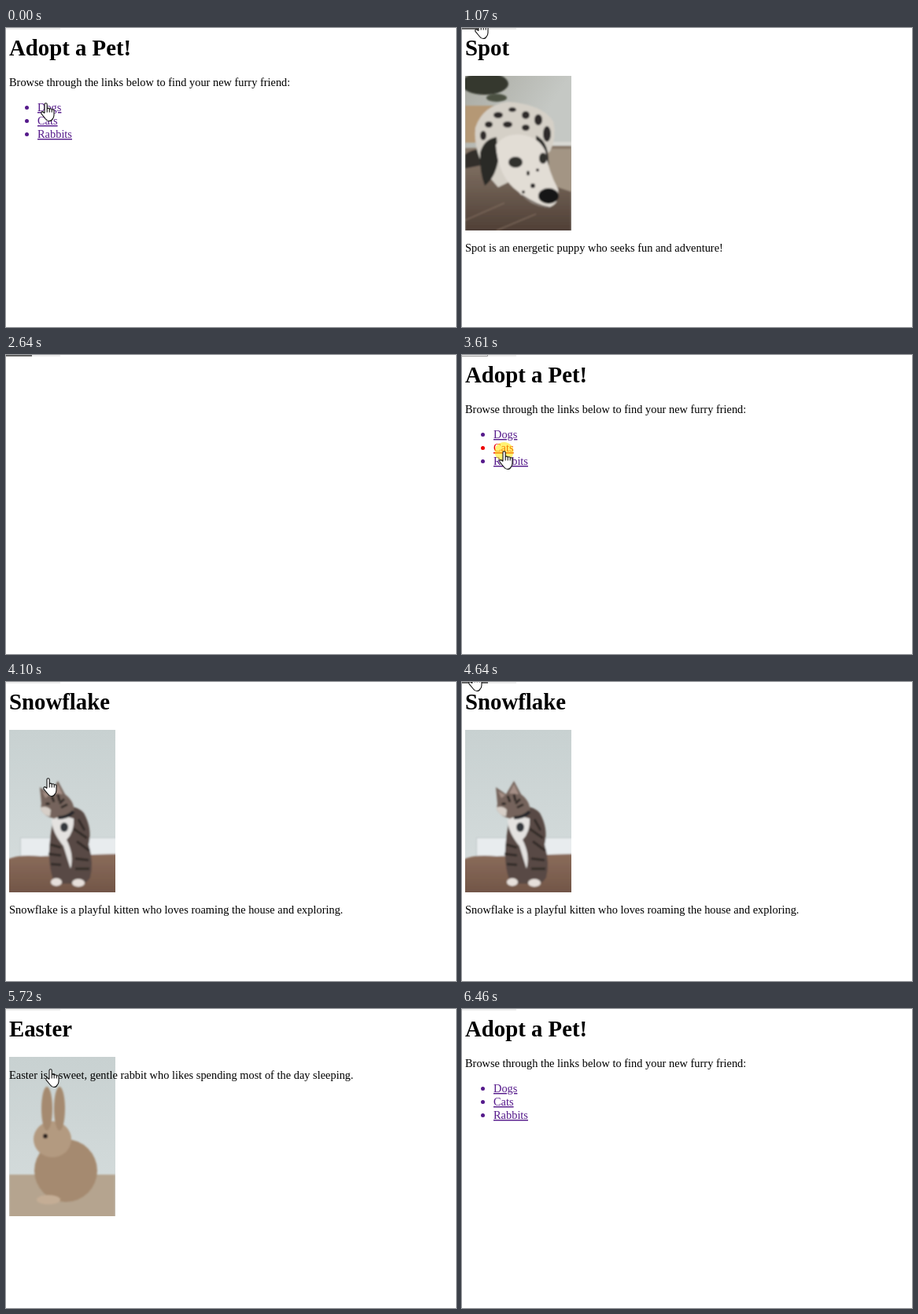
Write an HTML page that moves like this. It is 572x381 px and loops after 6520 ms.

```html
<!DOCTYPE html>
<html lang="en">
<head>
<meta charset="utf-8">
<title>Adopt a Pet</title>
<style>
  html, body { margin: 0; width: 100%; height: 100%; overflow: hidden; background: #fff; }
  svg { display: block; }
  text { font: 14.4px "Liberation Serif", "Times New Roman", serif; fill: #000; white-space: pre; }
  .title { font-size: 28.8px; font-weight: bold; }
  .link text { fill: #551a8b; text-decoration: underline; }
  .link circle { fill: #551a8b; }
  .link.active text, .link.active circle { fill: #e00; }
</style>
</head>
<body>
<svg id="stage" width="572" height="381" viewBox="0 0 572 381">
  <defs>
    <filter id="soft"><feGaussianBlur stdDeviation="0.8"/></filter>
    <linearGradient id="wall" x2="1" y2="1"><stop stop-color="#a9aaa2"/><stop offset=".5" stop-color="#c5c8c4"/></linearGradient>
    <linearGradient id="floor" x2="0" y2="1"><stop stop-color="#8b7b6c"/><stop offset="1" stop-color="#4e3e35"/></linearGradient>
    <linearGradient id="pale" x2="0" y2="1"><stop stop-color="#c8d1d1"/><stop offset="1" stop-color="#d6dddd"/></linearGradient>
    <linearGradient id="rug" x2="0" y2="1"><stop stop-color="#8b6c5b"/><stop offset="1" stop-color="#705446"/></linearGradient>
    <linearGradient id="grass" x2="0" y2="1"><stop stop-color="#b9c0a8"/><stop offset="1" stop-color="#6f7d56"/></linearGradient>
  </defs>
  <g id="pages"></g>
  <rect width="69" height="2" fill="#eee"/>
  <g id="barDark"><rect width="33" height="2" fill="#555"/><rect y="1" width="33" height="1" fill="#777"/></g>
  <path id="barLine" d="M0 1.5H32.5V0" fill="none" stroke="#999"/>
  <circle id="click" r="12" fill="#ffe800" opacity=".55"/>
  <path id="hand" fill="#fff" stroke="#111" stroke-width="1.1" stroke-linejoin="round"
    d="M5 13.5V2.3a1.6 1.6 0 0 1 3.2 0V8.5a1.5 1.4 0 0 1 3 0V9.2a1.5 1.4 0 0 1 3 0V10.2a1.4 1.4 0 0 1 2.8 0V16Q17 19 15 21Q14 23.5 11 23.5Q8 23.5 6.5 21L1 14.4Q.3 12.4 1.6 11.7Q3 11.4 5 13.5M8.2 8.5V12.5M11.2 9.2V12.5M14.2 10V12.5"/>
</svg>
<script>
const LOOP = 6520;
const $ = id => document.getElementById(id);

const line = (x, y, str, cls = "") => `<text x="${x}" y="${y}" class="${cls}">${str}</text>`;
const title = str => line(4, 35, str, "title");
const shape = (d, fill) => `<path d="${d}" fill="${fill}"/>`;
const oval = (x, y, rx, ry, fill) => `<ellipse cx="${x}" cy="${y}" rx="${rx}" ry="${ry}" fill="${fill}"/>`;
const box = (x, y, w, h, fill) => `<rect x="${x}" y="${y}" width="${w}" height="${h}" fill="${fill}"/>`;
const stroke = (d, color, w) => `<path d="${d}" fill="none" stroke="${color}" stroke-width="${w}"/>`;

const links = (y, names) => names.map((name, i) =>
  `<g class="link"><circle cx="26.5" cy="${y - 4.5 + 17 * i}" r="2.5"/>${line(40, y + 17 * i, name)}</g>`).join("");

const pet = (name, height, art, story) => title(name) +
  `<svg class="photo" x="4" y="61" width="135" height="${height}">${art}</svg>` +
  `<g class="story" data-drop="${height - 1}">${line(4, 89, story)}</g>`;

const blurred = art => `<g filter="url(#soft)">${art}</g>`;
const spots = [[42, 50, 6, 4], [60, 43, 5, 3], [77, 50, 5, 5], [93, 56, 5, 7], [30, 62, 5, 4], [54, 62, 6, 4],
  [104, 74, 5, 10], [23, 76, 4, 6], [77, 66, 5, 4], [80, 124, 2, 3], [86, 140, 3, 3], [74, 148, 2, 2], [92, 120, 2, 2]];

const spotArt = box(0, 0, 135, 197, "url(#wall)") + blurred(
  oval(25, 10, 30, 14, "#35382e") + oval(40, 28, 13, 5, "#4b5142") + shape("M0 38H38V85H0Z", "#b59875") +
  shape("M0 92L135 88V200H0Z", "url(#floor)") + box(90, 84, 50, 5, "#d8d8d3") +
  shape("M60 105L110 93H136V148L112 140Z", "#a39584") +
  shape("M0 100Q14 90 24 96L30 112L0 118Z", "#302d2a") +
  shape("M13 66Q22 38 54 33Q98 36 112 58Q117 78 108 96L62 132L42 142L30 128Q10 96 13 66Z", "#d5d0c7") +
  shape("M40 78Q24 80 19 98Q18 122 25 140Q38 130 42 108Z", "#2b2927") +
  shape("M90 76Q108 84 106 118Q98 112 90 92Z", "#2b2927") +
  shape("M39 88Q50 73 72 75Q94 78 102 96Q106 122 118 144Q121 165 104 168Q82 164 68 148Q42 130 39 88Z", "#e2ddd5") +
  spots.map(s => oval(...s, "#2d2b29")).join("") +
  oval(64, 110, 9, 7, "#33302e") + oval(99, 105, 5, 7, "#33302e") + oval(106, 153, 13, 10, "#191817") +
  stroke("M72 152Q92 166 108 168", "#70655e", 2) + stroke("M0 184L50 162M40 197L90 176", "#8a7566", 1));

const biscuitArt = box(0, 0, 135, 204, "url(#grass)") + blurred(
  oval(68, 160, 44, 58, "#c79d68") + oval(68, 85, 34, 36, "#d4ad7a") +
  oval(36, 88, 11, 27, "#a97b48") + oval(100, 88, 11, 27, "#a97b48") + oval(68, 104, 17, 16, "#e4c79c") +
  oval(55, 80, 4, 4, "#2c221a") + oval(81, 80, 4, 4, "#2c221a") + oval(68, 97, 7, 5, "#2c221a"));

const snowArt = box(0, 0, 135, 207, "url(#pale)") + blurred(
  box(14, 137, 130, 30, "#e8ecee") + box(14, 137, 130, 1, "#bfc6c8") + box(14, 137, 1, 30, "#bfc6c8") +
  shape("M-4 166Q10 158 40 161L139 158V211H-4Z", "url(#rug)") +
  shape("M56 112Q78 88 95 106Q106 126 101 146Q108 170 103 188Q98 198 84 196L58 196Q48 172 52 140Z", "#594a45") +
  shape("M41 94L39 73L52 82L62 65L71 82Q84 92 82 105Q73 116 57 113Q44 110 40 101Z", "#75645b") +
  shape("M42 78L51 83L46 87ZM56 81L62 69L68 82Z", "#a58f86") +
  shape("M54 114Q68 108 82 113Q83 130 73 140Q83 160 78 177L69 148Q54 130 54 114Z", "#e4e2e0") +
  shape("M40 99Q48 96 53 102L52 110Q44 110 40 101Z", "#d7cfc8") + oval(49, 94, 3, 1.5, "#292524") +
  stroke("M62 112Q74 112 82 104", "#26282a", 4) + oval(70, 124, 5, 6, "#35383d") +
  stroke("M54 84L57 92M62 82L64 91M70 88L64 94M74 95L66 99M88 114L96 128M82 126L99 138M86 142L102 154M52 146L66 150M50 158L66 160M53 171L66 172M84 164L101 166M84 177L102 177", "#302a28", 3) +
  oval(60, 194, 7, 5, "#e6dfda") + oval(88, 195, 8, 5, "#e6dfda"));

const easterArt = box(0, 0, 135, 203, "url(#pale)") + blurred(
  box(0, 150, 135, 60, "#b5a48f") + oval(72, 145, 40, 40, "#a58a70") + oval(55, 105, 24, 23, "#b39a80") +
  oval(48, 66, 7, 28, "#a58a70") + oval(64, 66, 7, 28, "#a58a70") + oval(46, 101, 3, 3, "#2a211c") +
  oval(50, 182, 15, 6, "#c4ad95"));

const pages = {
  blank: "",
  home: title("Adopt a Pet!") + line(4, 74, "Browse through the links below to find your new furry friend:") +
    links(106, ["Dogs", "Cats", "Rabbits"]),
  dogs: title("Dog Breeds") + links(74, ["Dalmatian", "Labrador"]),
  spot: pet("Spot", 197, spotArt, "Spot is an energetic puppy who seeks fun and adventure!"),
  biscuit: pet("Biscuit", 204, biscuitArt,
    "Biscuit is a calm and affectionate dog who loves long walks, belly rubs and naps on the couch."),
  snow: pet("Snowflake", 207, snowArt, "Snowflake is a playful kitten who loves roaming the house and exploring."),
  easter: pet("Easter", 203, easterArt, "Easter is a sweet, gentle rabbit who likes spending most of the day sleeping.")
};
$("pages").innerHTML = Object.entries(pages).map(([id, art]) => `<g id="${id}">${art}</g>`).join("");

// Page steps: time, page, then the pressed link or "bare" while the photo is loading
const pageTrack = [
  [0, "home"], [60, "home", 0], [220, "blank"], [370, "dogs"], [520, "dogs", 0],
  [670, "spot", "bare"], [760, "spot"], [1150, "blank"], [1300, "dogs"], [1470, "dogs", 1],
  [1550, "blank"], [1620, "biscuit", "bare"], [1700, "biscuit"], [2160, "blank"], [2240, "dogs"],
  [2640, "blank"], [2710, "home"], [3610, "home", 1], [3780, "blank"],
  [3950, "snow", "bare"], [4030, "snow"], [4800, "blank"], [4950, "home"], [5400, "home", 2],
  [5570, "blank"], [5720, "easter", "bare"], [5810, "easter"], [6050, "blank"], [6220, "home"]
];
const barTrack = [
  [0, "light"], [1070, "dark"], [1150, "light"], [1850, "dark"], [3610, "line"], [3780, "light"],
  [4640, "dark"], [5250, "light"], [5890, "dark"], [6370, "line"], [6460, "light"]
];
const glide = (t0, t1, steps, x0, y0, x1, y1) => Array.from({ length: steps }, (_, i) => {
  const k = i / (steps - 1);
  return [t0 + (t1 - t0) * k, x0 + (x1 - x0) * k, y0 + (y1 - y0) * k];
});
const AWAY = -40;
const handTrack = [
  [0, 44, 95], [370, 44, 80], [450, 44, 66], [990, 30, 26], [1070, 16, -10], [1150, 16, AWAY],
  [1300, 45, 84], ...glide(1700, 1850, 3, 36, 50, 14, -12), [2640, 14, AWAY],
  ...glide(3020, 3400, 6, 14, -10, 47, 122), ...glide(4410, 4640, 4, 40, 88, 8, -12),
  [4800, 8, AWAY], [5100, 14, -10], [5250, 48, 134], [5400, 48, 139],
  [5720, 50, 76], [5810, 36, 35], [5890, 18, -10], [6050, 18, AWAY]
];

const at = (track, t) => track.findLast(step => step[0] <= t);
const show = (el, on) => el.setAttribute("display", on ? "inline" : "none");

function render(t) {
  const [, page, mode] = at(pageTrack, t);
  const [, bar] = at(barTrack, t);
  const [, x, y] = at(handTrack, t);
  for (const id in pages) show($(id), id === page);

  const current = $(page);
  current.querySelectorAll(".link").forEach((link, i) => link.classList.toggle("active", i === mode));
  const story = current.querySelector(".story");
  if (story) {
    const bare = mode === "bare";
    show(current.querySelector(".photo"), !bare);
    story.setAttribute("transform", `translate(0 ${bare ? 0 : story.dataset.drop})`);
  }

  show($("barDark"), bar === "dark");
  show($("barLine"), bar === "line");
  $("hand").setAttribute("transform", `translate(${x} ${y})`);
  show($("click"), Number.isInteger(mode));
  $("click").setAttribute("transform", `translate(${x + 6.5} ${y + 1})`);
}

const start = performance.now();
function tick() {
  render((performance.now() - start) % LOOP);
  requestAnimationFrame(tick);
}
tick();
</script>
</body>
</html>
```
